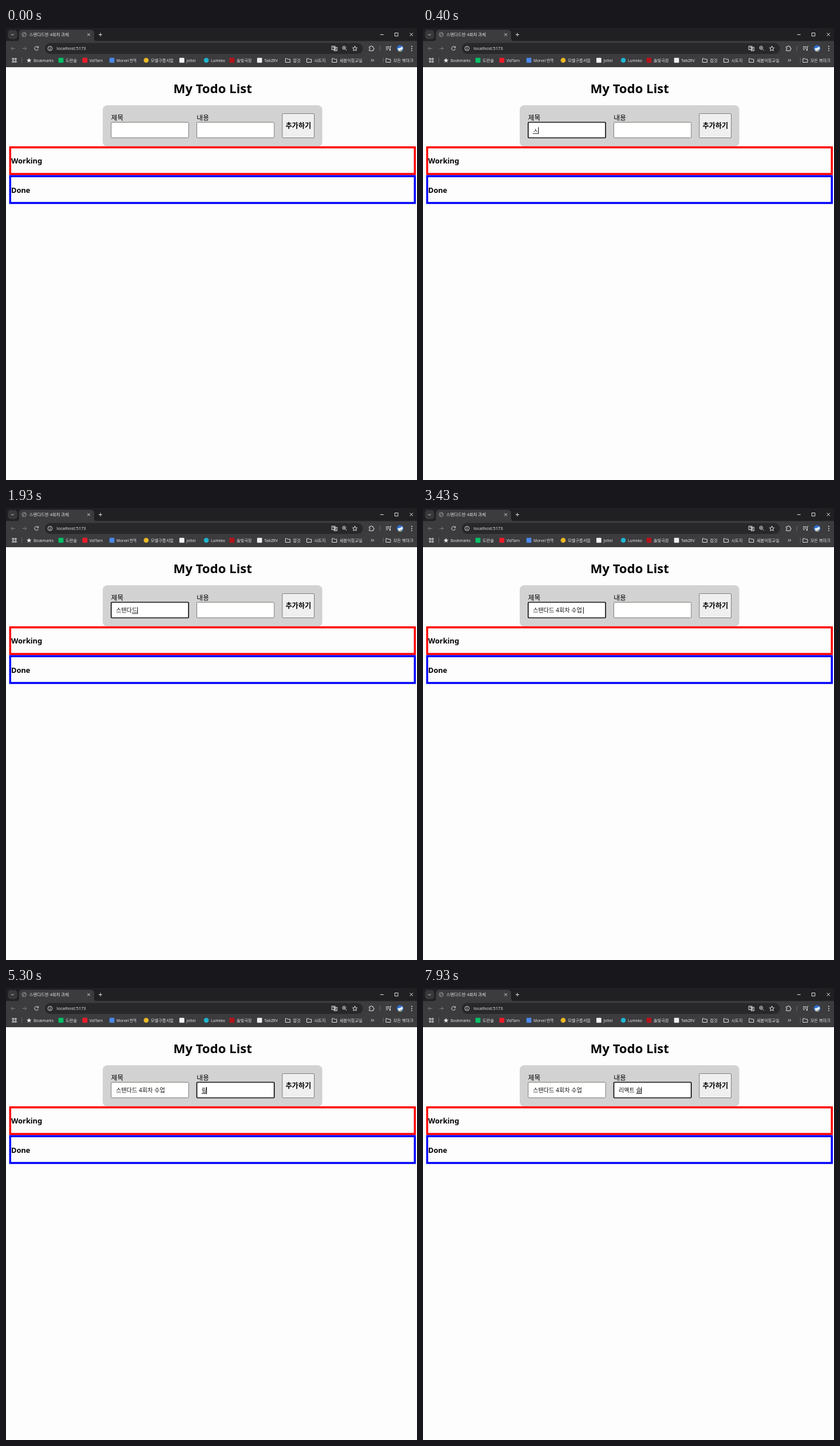
Recreate the animation shown at these times as an HTML page. Size 714 by 784 pixels, loop 8000 ms.

```html
<!DOCTYPE html>
<html lang="ko">
<head>
<meta charset="utf-8">
<title>My Todo List</title>
<style>
  html, body { margin: 0; height: 100%; overflow: hidden; background: #fdfdfd; }
  svg { display: block; width: 100vw; height: 100vh; }
  text { font-family: "Noto Sans", "Noto Sans CJK KR", "Noto Sans CJK", sans-serif; white-space: pre; }
  .line { fill: none; stroke: #e0e0e0; stroke-width: 1; }
  .dim { stroke: #7d7d7f; }
  .bar { fill: #e3e3e3; font-size: 7.2px; }
  .bold { font-weight: 700; }
  .entry { font-size: 10.1px; fill: #111; }
</style>
</head>
<body>
<svg viewBox="0 0 714 784">
  <defs>
    <path id="folder" class="line" d="M-4-3h3l1 1.2h4v5.3h-8z"/>
    <path id="star" d="M0-4.2 1.2-1.3 4.2-1.1 1.9.9 2.7 4 0 2.3-2.7 4-1.9.9-4.2-1.1-1.2-1.3z"/>
  </defs>

  <!-- Browser frame -->
  <rect width="714" height="23" fill="#202022"/>
  <rect x="3.5" y="3.5" width="16" height="16" rx="5" fill="#38383b"/>
  <path class="line" d="M9 10.5 11.3 12.8 13.6 10.5"/>
  <path fill="#3c3c3f" d="M18 23q4.500 0 4.500-5V9q0-6 6-6H147q6 0 6 6v9q0 5 5 5z"/>
  <g class="line" style="stroke:#96969a">
    <circle cx="31.500" cy="11.500" r="3.700"/>
    <path d="M28.500 9.500 31 11.500 30.500 14.500M32 8 33 10.500 35 11.500"/>
  </g>
  <text class="bar" x="40.500" y="14.300" style="font-size:7.35px">스탠다드반 4회차 과제</text>
  <path class="line" d="M141.500 9.300l4.400 4.400m0-4.400-4.400 4.400M161 11.500h6m-3-3v6M650 11.500h6M675.500 8.500h5.500v5.500h-5.500zM701.500 8.500l5.500 5.500m0-5.500-5.500 5.500"/>

  <rect y="22.500" width="714" height="45.500" fill="#3c3c3f"/>
  <rect x="67.500" y="26" width="552.500" height="19" rx="9.500" fill="#28282a"/>
  <path class="line dim" d="M16 35.500H9m3-3-3 3 3 3M28.500 35.500h7m-3-3 3 3-3 3"/>
  <path class="line" d="M55.600 33.300A3.300 3.300 0 1 0 56.200 36M56.300 31.500v2.500h-2.600"/>
  <circle class="line" cx="76.500" cy="35.500" r="3.800"/>
  <path class="line" d="M76.500 33v1M76.500 35v2.800"/>
  <text class="bar" x="88" y="38" style="font-size:7.5px">localhost:5173</text>
  <rect class="line" x="566" y="31.500" width="5.500" height="6"/>
  <rect class="line" x="570" y="33.500" width="5" height="6" fill="#28282a"/>
  <path class="line" d="M567.500 33.500h2.500M571.500 35.500h2M571.500 37.500h2"/>
  <circle class="line" cx="587.300" cy="34.300" r="2.800"/>
  <path class="line" d="M589.500 36.500l2.500 2.500M586 34.300h2.600M587.300 33v2.600"/>
  <use href="#star" class="line" x="606" y="35.500"/>
  <path class="line" d="M631 32.500h2.500q0-1.800 1.300-1.800t1.300 1.800h2v2.300q1.500 0 1.500 1.200t-1.500 1.200v2.300h-7.100v-2.300q1.400 0 1.400-1.200T631 34.800z"/>
  <path stroke="#66666a" d="M649.500 31v9M27.500 51.500v9M655.500 51.500v9"/>
  <path class="line" d="M660 32.500h6M660 35h6M660 37.500h3M667.500 38v-6h2"/>
  <circle cx="667" cy="38" r="1.300" fill="#e0e0e0"/>
  <circle cx="684.700" cy="35.500" r="5.800" fill="#2e70d4"/>
  <path d="M680 35q4 1 8.500-3l1 4q-3 4-7.500 3z" fill="#eef0ee"/>
  <path d="M680 38.800q5 2 9.500-.3-4.500 5-9.500.3z" fill="#e5c447"/>
  <path fill="#e0e0e0" d="M704 31h1.700v1.700h-1.700zM704 34.700h1.700v1.700h-1.700zM704 38.400h1.700v1.700h-1.700z"/>
  <path class="line" d="M11 52.500h2.500v2.500H11zM15.500 52.500h2.500v2.500h-2.500zM11 57h2.500v2.500H11zM15.500 57h2.500v2.500h-2.500z"/>
  <use href="#star" x="40" y="56" fill="#e0e0e0"/>
  <path class="line" d="M634 53.800l2.200 2.200-2.200 2.200M637 53.800l2.200 2.200-2.200 2.200"/>
  <g id="marks"></g>

  <!-- Page -->
  <text class="bold" x="359" y="113" text-anchor="middle" font-size="22">My Todo List</text>
  <rect x="168" y="134" width="381.500" height="71.500" rx="8" fill="#d2d2d3"/>
  <text x="182.500" y="159.800" font-size="11.700">제목</text>
  <text x="331.300" y="159.800" font-size="11.700">내용</text>
  <g id="fields"></g>
  <rect x="480" y="148.500" width="55.500" height="42" rx="1.500" fill="#efefef" stroke="#7c7c82"/>
  <text class="bold" x="508" y="173.800" text-anchor="middle" font-size="12.100">추가하기</text>
  <rect x="7.250" y="207" width="703" height="46.200" fill="none" stroke="#f00" stroke-width="3.500"/>
  <rect x="7.250" y="257" width="703" height="46.500" fill="none" stroke="#00f" stroke-width="3.500"/>
  <text class="bold" x="9" y="235.300" font-size="12.700">Working</text>
  <text class="bold" x="9" y="286" font-size="12.700">Done</text>
</svg>
<script>
const LOOP = 8000, BLINK = 530;

function add(parent, tag, attrs, text = '') {
  const el = document.createElementNS('http://www.w3.org/2000/svg', tag);
  for (const k in attrs) el.setAttribute(k, attrs[k]);
  el.textContent = text;
  return parent.appendChild(el);
}

// Bookmarks: icon centre, icon ('s'quare, 'c'ircle, 'f'older or none), colour, label
const marks = document.getElementById('marks');
[
  [40, '', '', 'Bookmarks'],
  [95.5, 's', '#06c167', '도란숲'],
  [137, 's', '#ed1c2b', 'VidTarn'],
  [184, 's', '#4a88e8', 'Morvel 번역'],
  [243.5, 'c', '#e9b824', '모벨구름서랍'],
  [305.5, 's', '#f2f2f2', 'Jottel'],
  [348, 'c', '#1eb4cf', 'Lumeko'],
  [392.5, 's', '#b5121b', '솔빛극장'],
  [440.5, 's', '#eeeeee', 'TalkZRV'],
  [489.5, 'f', '', '잡것'],
  [526.5, 'f', '', '시트지'],
  [570.5, 'f', '', '새봄익힘교실'],
  [664, 'f', '', '모든 북마크'],
].forEach(([x, icon, fill, label]) => {
  if (icon === 's') add(marks, 'rect', { x: x - 4.3, y: 51.7, width: 8.6, height: 8.6, rx: 1, fill });
  if (icon === 'c') add(marks, 'circle', { cx: x, cy: 56, r: 4.3, fill });
  if (icon === 'f') add(marks, 'use', { href: '#folder', x, y: 56 });
  const size = /^[A-Z]/.test(label) ? 6.5 : 7.2;
  add(marks, 'text', { class: 'bar', x: x + (icon === 'f' ? 9 : 8), y: 58.6, style: `font-size:${size}px` }, label);
});

function makeField(left) {
  const g = document.getElementById('fields');
  return {
    x: left + 8.2,
    box: add(g, 'rect', { x: left, y: 163.5, width: 134.5, height: 27, rx: 1.5, fill: '#fff' }),
    text: add(g, 'text', { class: 'entry', x: left + 8.2, y: 181 }),
    under: add(g, 'rect', { y: 182.5, height: 1, fill: '#111' }),
    caret: add(g, 'rect', { y: 172, width: 1, height: 11.5, fill: '#111' }),
  };
}
const fields = [makeField(182.7), makeField(331.5)];

// Keystrokes: time, field, committed text, syllable being composed
const strokes = [
  [0, -1, '', ''],
  [200, 0, '', ''],
  [370, 0, '', 'ㅅ'],
  [530, 0, '', '스'],
  [870, 0, '', '슽'],
  [1030, 0, '스', '태'],
  [1230, 0, '스', '탠'],
  [1600, 0, '스탠', 'ㄷ'],
  [1730, 0, '스탠', '다'],
  [1830, 0, '스탠', '닫'],
  [1930, 0, '스탠다', '드'],
  [2100, 0, '스탠다드 ', ''],
  [2330, 0, '스탠다드 4', ''],
  [2530, 0, '스탠다드 4', 'ㅎ'],
  [2600, 0, '스탠다드 4', '호'],
  [2770, 0, '스탠다드 4', '회'],
  [2870, 0, '스탠다드 4', '횣'],
  [2930, 0, '스탠다드 4회', '차'],
  [3030, 0, '스탠다드 4회차 ', ''],
  [3100, 0, '스탠다드 4회차 ', 'ㅅ'],
  [3170, 0, '스탠다드 4회차 ', '수'],
  [3230, 0, '스탠다드 4회차 ', '숭'],
  [3300, 0, '스탠다드 4회차 수', '어'],
  [3370, 0, '스탠다드 4회차 수', '업'],
  [3430, 0, '스탠다드 4회차 수업 ', ''],
  [4500, 1, '', ''],
  [4670, 1, '', 'ㄹ'],
  [5000, 1, '', '리'],
  [5170, 1, '', '링'],
  [5330, 1, '리', '애'],
  [5530, 1, '리', '액'],
  [5770, 1, '리액', '트'],
  [7500, 1, '리액트 ', ''],
  [7600, 1, '리액트 ', 'ㅅ'],
  [7700, 1, '리액트 ', '스'],
  [7930, 1, '리액트 ', '슬'],
];

function draw(t) {
  fields.forEach((f, i) => {
    const past = strokes.filter(s => s[0] <= t);
    const [, , done, comp] = past.filter(s => s[1] === i).pop() || [0, i, '', ''];
    const [since, focus] = past.pop();
    const active = focus === i;

    f.box.setAttribute('stroke', active ? '#101010' : '#7b7b72');
    f.box.setAttribute('stroke-width', active ? 1.7 : 1);

    f.text.textContent = done;
    const start = done ? f.text.getComputedTextLength() : 0;
    f.text.textContent = done + comp;
    const end = done + comp ? f.text.getComputedTextLength() : 0;
    f.under.setAttribute('x', f.x + start);
    f.under.setAttribute('width', active && comp ? end - start : 0);

    const lit = active && Math.floor((t - since) / BLINK) % 2 === 0;
    f.caret.setAttribute('x', Math.round(f.x + end - 0.5));
    f.caret.setAttribute('visibility', lit ? 'visible' : 'hidden');
  });
}

const begin = performance.now();
function tick(now) {
  draw(Math.max(0, now - begin) % LOOP);
  requestAnimationFrame(tick);
}
draw(0);
requestAnimationFrame(tick);
</script>
</body>
</html>
```
